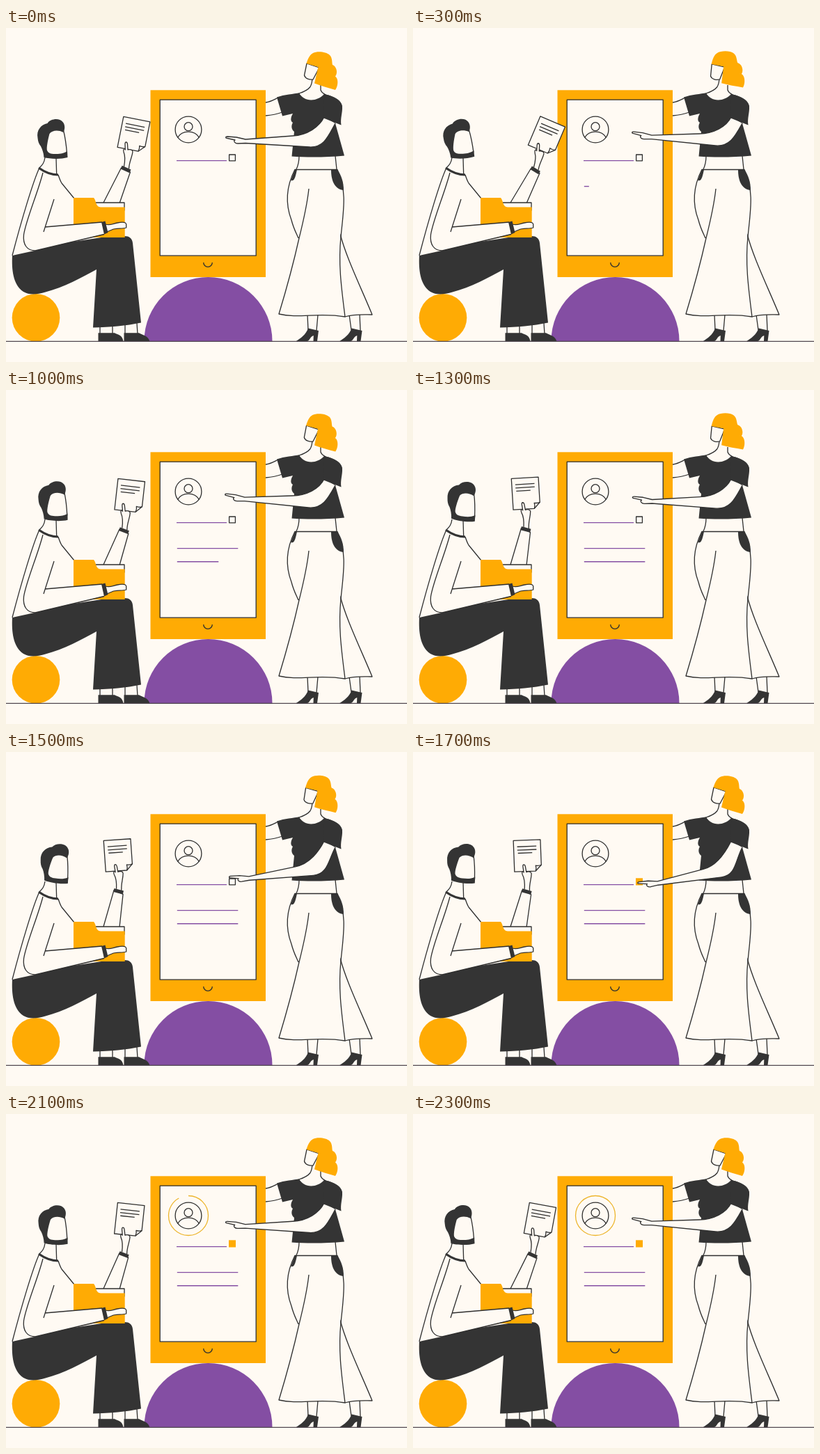
An HTML page with a canvas that plays this animation: 576x480 px, repeating every 2.4 s.

```html
<!DOCTYPE html>
<html lang="en">
<head>
<meta charset="utf-8">
<title>Filling in a profile</title>
<style>
html, body { margin: 0; width: 100%; height: 100%; overflow: hidden; background: #fffaf3; }
canvas { display: block; width: 576px; height: 480px; }
</style>
</head>
<body>
<canvas id="stage"></canvas>
<script>
const canvas = document.getElementById('stage');
const ctx = canvas.getContext('2d');
const dpr = window.devicePixelRatio || 1;
canvas.width = 576 * dpr;
canvas.height = 480 * dpr;

const PAPER = '#fffaf3', INK = '#2f2f2f', DARK = '#343434', ORANGE = '#ffab04', PURPLE = '#844ea3';
const LOOP = 2400, STEP = 100, RAD = Math.PI / 180;

function fill(d, color) {
  ctx.fillStyle = color;
  ctx.fill(new Path2D(d));
}
function line(d, width = 1.3, color = INK) {
  ctx.strokeStyle = color;
  ctx.lineWidth = width;
  ctx.stroke(new Path2D(d));
}
function shape(d) {
  fill(d, PAPER);
  line(d);
}
function disc(x, y, r, color) {
  ctx.beginPath();
  ctx.arc(x, y, r, 0, 7);
  ctx.fillStyle = color;
  ctx.fill();
}
function arc(x, y, r, from, to, color = INK) {
  ctx.beginPath();
  ctx.arc(x, y, r, from, to);
  ctx.strokeStyle = color;
  ctx.lineWidth = 1.3;
  ctx.stroke();
}
function turned(x, y, deg, draw) {
  ctx.save();
  ctx.translate(x, y);
  ctx.rotate(deg * RAD);
  draw();
  ctx.restore();
}

// Smooth curve through [time, value] keys, flat at peaks.
function track(keys) {
  const rise = i => (keys[i + 1][1] - keys[i][1]) / (keys[i + 1][0] - keys[i][0]);
  const tangents = keys.map((k, i) => {
    if (!i || i === keys.length - 1) return 0;
    const a = rise(i - 1), b = rise(i);
    return a * b > 0 ? 2 * a * b / (a + b) : 0;
  });
  return t => {
    let i = 0;
    while (i < keys.length - 2 && t >= keys[i + 1][0]) i++;
    const [t0, v0] = keys[i], [t1, v1] = keys[i + 1];
    const h = t1 - t0, u = (t - t0) / h, w = 1 - u;
    return v0 * (1 + 2 * u) * w * w + v1 * u * u * (3 - 2 * u)
      + h * u * w * (tangents[i] * w - tangents[i + 1] * u);
  };
}

const sheetTilt = track([[-100, 10.3], [0, 11.3], [300, 23], [450, 24.5], [700, 19.5], [1300, -3.5],
  [1480, -4], [1700, -2.2], [1900, 1.3], [2300, 10.3], [2400, 11.3], [2700, 23]]);
const nod = track([[0, 0], [300, -6], [700, -0.7], [900, 0], [1300, -6], [1700, 0], [2400, 0]]);
const fingerY = track([[0, 157], [300, 150], [1200, 150], [1300, 154], [1620, 189], [1700, 188],
  [1900, 170], [2250, 150], [2400, 150]]);

// Eased progress from a to b
function ease(t, a, b) {
  const u = Math.min(1, Math.max(0, (t - a) / (b - a)));
  return u < 0.5 ? 2 * u * u : 1 - 2 * (1 - u) * (1 - u);
}

function drawPhone(t) {
  ctx.fillStyle = ORANGE;
  ctx.fillRect(207.5, 89.3, 165.5, 268.7);
  shape('M221.2 103.2H359.2V327.2H221.2Z');
  arc(290, 337, 6.3, 0, Math.PI);

  arc(262, 146, 18.9, 0, 7);
  arc(262, 141.7, 6, 0, 7);
  line('M246.5 157.5C250 151.5 256 149.2 262 149.2S274 151.5 277.5 157.5');
  const ring = ease(t, 1700, 2200);
  if (ring) arc(262, 146, 28.5, -Math.PI / 2, (ring * 2 - 0.5) * Math.PI, '#edb52c');

  line('M245 190.6H317', 1.4, PURPLE);
  const rows = [[227.6, 200, 700], [246.7, 700, 1200]];
  for (const [y, a, b] of rows) {
    const w = 87.5 * ease(t, a, b);
    if (w) line(`M245.8 ${y}h${w}`, 1.4, PURPLE);
  }
  if (t >= 1600) fill('M320 181.3h10v10.2h-10Z', ORANGE);
  else line('M320.6 182h8.8v8.8h-8.8Z');
}

function drawManHead(deg) {
  turned(66, 190, deg, () => {
    ctx.translate(-66, -190);
    fill('M62 150L83 147Q86 161 87.5 180L58 181Z', PAPER);
    line('M82.5 147Q86 161 87.5 180');
    fill('M45.5 158C43.5 147 50 139 59.5 137C64 130 77 129 81.5 135C85 139 85 145 82.5 150'
      + 'C75 146 66 147 62.5 152C60 161 58 172 59 176C61 180 64 181 70 181C76 181 82 181 88 177L88.5 186'
      + 'C78 189 62 188 54.5 186C54 179 52 174 50 170C47 166 46 163 45.5 158Z', DARK);
  });
}

function drawSheet(x, y, tilt) {
  turned(x, y, tilt, () => {
    shape('M-19.4 -22.3H19.4V14L11 22.5H-19.4Z');
    line('M11 22.5Q12.5 18 11.3 14.5Q16 15.5 19.4 14');
    line('M-14.3 -13.3H13.3M-14.3 -8.5H13.3M-13.5 -4H7');
  });
}

function drawRaisedArm(d) {
  const bend = (base, b, c) => base + b * d + c * d * d;
  const x = bend(172, 0.465, -0.0142), y = bend(203, 0.146, -0.0015);
  drawSheet(bend(183.5, 1.047, -0.0274), bend(153, 0.23, -0.005), d + 11.3);
  shape(`M140 251L${x - 6.5} ${y - 2}L${x + 6.5} ${y + 4}L163 252`);
  turned(x, y, d * 0.5, () => {
    shape('M-2.5 -4C-1 -12 -0.5 -19 -3 -25C-4 -29 -2 -31 -0.7 -28L-1 -36'
      + 'C-1 -40 2 -40 2.5 -36L3 -28C6 -29 10 -28 10 -25C9 -17 5 -11 4.5 -1');
  });
  turned(x, y, 24 + d * 0.62, () => fill('M-7 -2.7H7V2.5H-7Z', DARK));
}

function drawMan(t) {
  const d = sheetTilt(t) - 11.3;
  line('M135 428V440M153 428V440M171 424V440M188 424L189 440');
  fill('M132.5 450V438.3H156C161 441 167 441 168.5 450Z', DARK);
  fill('M169.5 450V438.3H191C196 441.5 204 442 206.3 450Z', DARK);
  fill('M9 327C8 347 10 369 25 379C33 384 45 383 55 380C85 372 108 359 130 347L125 430.5'
    + 'C150 430 172 428 194 423.5L182 309C181 302 177 299 170 299L150 299L40 316Z', DARK);

  fill('M48 201L9 327L41 320L98 300V245L75 210Z', PAPER);
  line('M48 201C39 220 22 277 9 327');
  line('M56 186C55 194 52 197 48 201M72 187L72.7 210M75 211C77 217 78 220 80 223L98 245');
  line('M47 201Q61 211 75 211', 3.2, DARK);
  drawManHead(-0.347 * d + 0.0085 * d * d);

  drawRaisedArm(d);
  shape('M127 251H170V262H127Z');
  fill('M97 244H126C130 248 128 257 136 257.5H170.7V301H97Z', ORANGE);

  fill('M53 213C46 240 29 275 25.5 297C24 311 30 320 42 320L141 296L138 279L57 286L69 246Z', PAPER);
  line('M53 208C46 236 29 275 25.5 297C24 311 30 320 42 320L141 296.5');
  line('M69 246L54 293M56 286L138 279');
  shape('M143 282C149 284 154 281 160 280C167 278.5 172 279 172.7 282V287C166 289 157 287 152 290L145 293');
  fill('M137 279L142.5 277.5L146.5 294L141 296.5Z', DARK);
}

function drawWomanHead(deg) {
  turned(440, 78, deg, () => {
    ctx.translate(-440, -78);
    shape('M432 51L428.5 68C430 73 436 74.5 441 74L450 57Z');
    fill('M431.5 51C434 43 437 38 441 36C447 33 460 34 465 39C469 43 468 49 469 53C475 55 477 65 473 69.5'
      + 'C478 73 477 84 473 89C463 86 452 83 443 79.5L448.5 56Z', ORANGE);
  });
}

function drawPointingArm(v) {
  const k = (v - 157) / 31, ex = 441 + 6 * k, ey = 163 + 8 * k;
  const turn = Math.asin((ey - v) / 125.1) - Math.asin(6 / 125.1);
  const cos = Math.cos(turn), sin = Math.sin(turn);
  const at = (x, y) => `${ex + x * cos - y * sin} ${ey + x * sin + y * cos} `;
  shape('M457 128C450 142 ' + at(-8, -9) + at(-29, -8)
    + 'L' + at(-97, -3) + 'L' + at(-110, -6) + 'L' + at(-123, -7)
    + 'C' + at(-126, -7) + at(-126, -4.5) + at(-123, -4.5)
    + 'L' + at(-112, -2) + 'C' + at(-115, -0.5) + at(-112, 3) + at(-108, 3)
    + 'L' + at(-97, 2.5) + 'L' + at(-5, 8)
    + 'C' + at(16, 9) + '463 155 473 137');
}

function drawWoman(t) {
  line('M373 107C380 106 385 103 391 100M373 126Q386 125 397 121');

  line('M433 412L434 434M448 412L446 435M493 412L496 434M508 411L509 435');
  for (const x of [0, 62.5]) {
    fill(`M${434 + x} 431.5l15 3.5l-2 15h-5.5l0.3 -8c-5 1 -5.5 8 -9.5 8h-15.5c6 -4 14 -9 17.2 -18.5Z`, DARK);
  }

  shape('M480 296C488 328 509 371 526 412C512 412 500 411 487 415');
  fill('M415 203C403 227 400 250 410 276C413 288 416 295 420 303L392 411C420 418 450 408 487 415'
    + 'C482 375 478 340 480 300C486 260 490 235 476 203.5Z', PAPER);
  line('M420 302C417 295 413 288 410 276C400 250 403 227 415 203.3L476 203.5C490 235 485 260 481 300'
    + 'C477 340 482 375 487 415C450 408 420 418 392 411C402 378 413 338 421 302C428 274 433 250 435 231');
  fill('M467 204H476C482 212 485 222 485 233C473 232 467 221 467 204Z', DARK);
  fill('M418 203.5H415L409 219C415 221 416 212 418 203.5Z', DARK);
  line('M421 184C421 192 420 197 417 203M473 184L475 203');

  fill('M389 99.5C400 95.5 413 95 422 93L457 95C468 97 482 103 483 113L473 137L486 183.5'
    + 'C460 186 432 186 410.5 184.5L414 149C409 145 410 139 412 136C408 134 409 128 412 123L397 126.5Z', DARK);
  fill('M440 72L438 86L421 93C427 106 446 107 457 95L452 90V80Z', PAPER);
  line('M440 73C439 82 439 88 421 94M452 82V89Q453 93 460 96.5');
  drawWomanHead(nod(t));

  drawPointingArm(fingerY(t));
  fill('M459 95.5C470 98 482 103 483 113C483.5 122 480 130 481.5 139.5L455 129L456 104Z', DARK);
}

function draw(t) {
  ctx.setTransform(dpr, 0, 0, dpr, 0, 0);
  ctx.lineJoin = 'round';
  ctx.fillStyle = PAPER;
  ctx.fillRect(0, 0, 576, 480);
  fill('M198.5 450A92 92 0 0 1 382.5 450Z', PURPLE);
  disc(43, 416.3, 34.3, ORANGE);
  drawPhone(t);
  drawWoman(t);
  drawMan(t);
  line('M0 450.3H576', 1.3, '#51474f');
}

const start = performance.now();
function tick() {
  const t = (performance.now() - start) % LOOP;
  draw(Math.floor(t / STEP) * STEP);
  requestAnimationFrame(tick);
}
tick();
</script>
</body>
</html>
```
